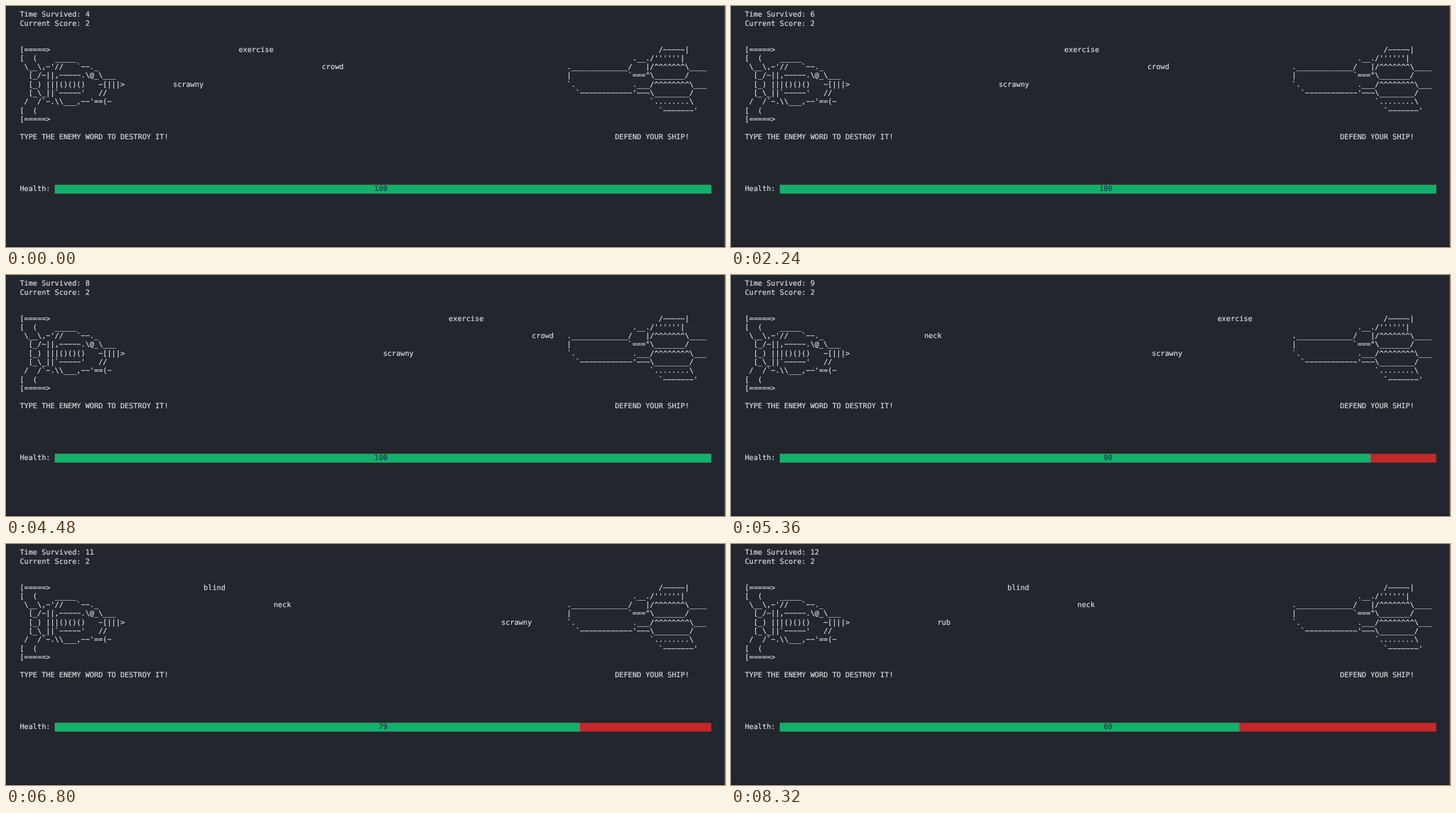
An HTML page that plays this animation: 1012 by 340 pixels, repeating every 8.4 s.

```html
<!DOCTYPE html>
<html lang="en">
<head>
<meta charset="utf-8">
<title>Typing defence</title>
<style>
  html, body { margin: 0; width: 100%; height: 100%; overflow: hidden; background: #22262d; }
  #stage {
    position: relative; width: 1012px; height: 340px; overflow: hidden;
    background: #22262d; color: #e0e1e4;
    font: 10.23px/12.3px "DejaVu Sans Mono", monospace;
    text-rendering: geometricPrecision; font-variant-ligatures: none;
    -webkit-text-stroke: 0.15px;
  }
  #stage > * { position: absolute; margin: 0; }
  pre {
    font: inherit; white-space: pre;
    left: calc(19.4px + var(--c) * 6.16px);
    top: calc(7.3px + var(--r) * 12.3px);
  }
  svg { left: 0; top: 0; }
  #hp { color: #1b2f4c; }
  .bottom { left: 0; top: 338px; width: 1012px; height: 2px; background: #1c1d25; }
  .right { left: 1011px; top: 0; width: 1px; height: 340px; background: #505358; }
</style>
</head>
<body>
<div id="stage">
<div class="bottom"></div>
<div class="right"></div>
<svg width="1012" height="340">
  <rect x="68.7" y="252.3" width="924" height="12.3" fill="#c4282a"/>
  <rect id="green" x="68.7" y="252.3" width="924" height="12.3" fill="#10b26c"/>
</svg>
<pre id="stats" style="--c:0;--r:0"></pre>
<pre style="--c:0;--r:4">[=====&gt;
[  (    _____
 \__\,−'//   `−−._
  [_/~||,−−−−−.\@_\___
  [_) |||()()()   ~[|||&gt;
  [_\_||`−−−−−'   //
 /  /`−.\\___,−−'==(−
[  (
[=====&gt;</pre>
<pre style="--c:125;--r:4">                     /~~~~~|
               .__./''''''|
._____________/   |/^^^^^^^\____
|             `==="\_______/
`.             .___/^^^^^^^^\___
  `−−−−−−−−−−−−'~~~\________/
                   `........\
                     `−−−−−−−'</pre>
<pre style="--c:0;--r:14">TYPE THE ENEMY WORD TO DESTROY IT!</pre>
<pre style="--c:136;--r:14">DEFEND YOUR SHIP!</pre>
<pre style="--c:0;--r:20">Health:</pre>
<pre id="hp" style="--c:81;--r:20"></pre>
</div>
<script>
const LOOP = 8400, STEP = 80;
const SPAWN = 34, SHIP = 125, BAR = 150, CELL = 6.16;
const HEALTH = [100, 90, 79, 69];
// Moments at which the words hold still for one step
const PAUSES = [320, 800, 1040, 1760, 2080, 2720, 3440, 3680, 4960, 5920, 6960];

const $ = id => document.getElementById(id);
const stage = $("stage");

function setText(el, text) {
  if (el.textContent !== text) el.textContent = text;
}

const lanes = [
  { row: 4, col: 50, words: ["exercise", "blind"] },
  { row: 6, col: 69, words: ["crowd", "neck"] },
  { row: 8, col: 35, words: ["scrawny", "rub"] }
];
for (const lane of lanes) {
  lane.el = document.createElement("pre");
  lane.el.style.setProperty("--r", lane.row);
  stage.append(lane.el);
}

function draw(ms) {
  const t = Math.floor(ms / STEP) * STEP;
  const moved = t / STEP - PAUSES.filter(p => p <= t).length;
  let hits = 0;

  for (const { el, col, words } of lanes) {
    const past = col + moved + words[0].length - SHIP;
    const hit = past >= 0;
    if (hit) hits++;
    setText(el, words[hit ? 1 : 0]);
    el.style.setProperty("--c", hit ? SPAWN + past : col + moved);
  }

  const seconds = 4 + Math.floor((t + 160) / 960);
  setText($("stats"), `Time Survived: ${seconds}\nCurrent Score: 2`);

  const hp = String(HEALTH[hits]);
  setText($("hp"), hp);
  $("hp").style.setProperty("--c", 8 + Math.floor((BAR - hp.length) / 2));
  $("green").setAttribute("width", (BAR - 15 * hits) * CELL);
}

const start = performance.now();
function tick() {
  draw((performance.now() - start) % LOOP);
  requestAnimationFrame(tick);
}
tick();
</script>
</body>
</html>
```
